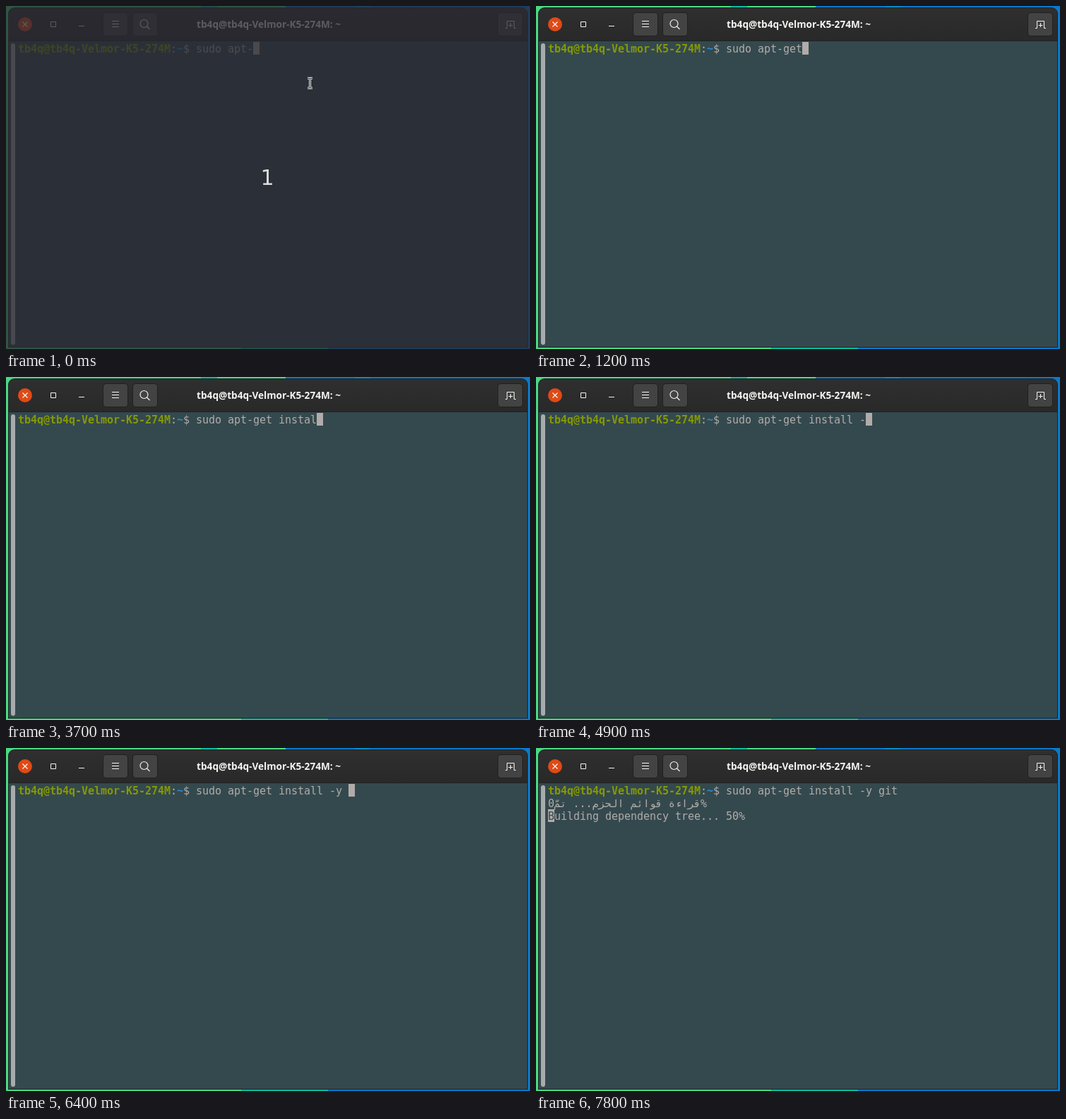
Write an HTML page with a canvas that moves like this. It is 742 px wide and 487 px high and loops after 8 s.

```html
<!DOCTYPE html>
<html lang="en">
<head>
<meta charset="utf-8">
<title>Terminal</title>
<style>
html, body { margin: 0; width: 100%; height: 100%; overflow: hidden; background: #34494e; }
canvas { display: block; }
</style>
</head>
<body>
<canvas id="stage" width="742" height="487"></canvas>
<script>
const g = document.getElementById('stage').getContext('2d');
const LOOP = 8000, CELL = 9, LINE = 18, LEFT = 17, TOP = 51;
const BG = '#34494e', FG = '#b1aca9', WHITE = '#f4f4f2';
const MONO = '15px "DejaVu Sans Mono", monospace';
const USER = 'tb4q@tb4q-Velmor-K5-274M';
const COMMAND = 'sudo apt-get install -y git';
const START = USER.length + 4;

// [time, typed characters, cursor hidden]
const KEYS = [
  [0, 9], [700, 11], [1200, 12], [1800, 12, 1], [2100, 12], [2400, 14],
  [2600, 15], [2800, 16], [3100, 17], [3500, 18], [3700, 19], [4500, 20],
  [4600, 20, 1], [4900, 22], [5300, 23], [5700, 22], [6100, 23], [6400, 24],
  [6900, 25], [7200, 26], [7400, 27], [7700, 27, 1]
];

function rect(x, y, w, h, color) {
  g.fillStyle = color;
  g.fillRect(x, y, w, h);
}

function round(x, y, w, h, r, color) {
  g.fillStyle = color;
  g.beginPath();
  g.roundRect(x, y, w, h, r);
  g.fill();
}

function stroke(path, color = WHITE, width = 1) {
  g.strokeStyle = color;
  g.lineWidth = width;
  g.stroke(new Path2D(path));
}

function cells(text, col, row, color, bold) {
  g.font = (bold ? 'bold ' : '') + MONO;
  g.fillStyle = color;
  [...text].forEach((ch, i) =>
    g.fillText(ch, LEFT + (col + i) * CELL, TOP + row * LINE + 15));
}

function cursor(col, row) {
  rect(LEFT + col * CELL, TOP + row * LINE, CELL, LINE, FG);
}

function button(x) {
  round(x, 9, 36, 34, 5, '#202020');
  round(x + 1, 10, 34, 32, 4, '#434343');
}

function drawDesktop() {
  const green = '#4bd983', teal = '#08bd9d', blue = '#0b79c9';
  rect(0, 0, 742, 487, green);
  rect(396, 0, 346, 487, blue);
  rect(276, 0, 23, 3, teal);
  rect(494, 0, 22, 3, '#078bc4');
  rect(333, 484, 123, 3, teal);
}

function drawWindow() {
  round(3, 2, 736, 483, [9, 9, 0, 0], '#1d2224');
  const bar = g.createLinearGradient(0, 3, 0, 49);
  bar.addColorStop(0, '#2f2f2f');
  bar.addColorStop(1, '#292929');
  round(4, 3, 734, 46, [8, 8, 0, 0], bar);
  rect(4, 50, 734, 434, BG);
  round(7, 53, 6, 428, 3, '#a8abac');

  round(17, 16, 20, 20, 10, '#df4a16');
  stroke('M23.5 22.5l7 7m0-7l-7 7', WHITE, 1.3);
  stroke('M63.5 22.5h7v7h-7z');
  stroke('M103 28.5h8');
  button(137);
  stroke('M150 21.5h10M150 25.5h10M150 29.5h10');
  button(179);
  stroke('M201 25a5.5 5.5 0 1 1-11 0a5.5 5.5 0 1 1 11 0M199.5 29l4 4', WHITE, 1.2);
  button(696);
  stroke('M707 31.5h2.5v-10h10v10h2.5M714.5 24v6M711.5 27.5h6');

  g.font = 'bold 13.6px "Open Sans", sans-serif';
  g.fillStyle = WHITE;
  g.textAlign = 'center';
  g.fillText(USER + ': ~', 372, 31);
  g.textAlign = 'left';
}

function drawOutput() {
  cells('0', 0, 1, FG);
  cells('%', 24, 1, FG);
  g.direction = 'rtl';
  g.textAlign = 'right';
  g.fillText('قراءة قوائم الحزم... تمّ', LEFT + 24 * CELL, TOP + LINE + 15);
  g.direction = 'ltr';
  g.textAlign = 'left';
  cursor(0, 2);
  cells('B', 0, 2, BG);
  cells('uilding dependency tree... 50%', 1, 2, FG);
}

function drawCountdown() {
  rect(0, 0, 742, 487, 'rgba(40, 41, 48, 0.75)');
  g.font = '30px "DejaVu Sans", sans-serif';
  g.fillStyle = '#dcdddd';
  g.textAlign = 'center';
  g.fillText('1', 370, 254);
  g.textAlign = 'left';
  const beam = 'M427 102.5h3l.5.5l.5-.5h3M430.5 103v13M427 116.5h3l.5-.5l.5.5h3';
  stroke(beam, '#f5f5f5', 3);
  stroke(beam, '#15181b', 1);
}

function draw(t) {
  const [, typed, hidden] = KEYS.findLast(k => k[0] <= t);
  drawDesktop();
  drawWindow();
  cells(USER, 0, 0, '#859900', true);
  cells(':', START - 4, 0, FG);
  cells('~', START - 3, 0, '#268bd2', true);
  cells('$', START - 2, 0, FG);
  cells(COMMAND.slice(0, typed), START, 0, FG);
  if (!hidden) cursor(START + typed, 0);
  if (t >= 7800) drawOutput();
  else if (t >= 7700) cursor(0, 1);
  if (t < 400) drawCountdown();
}

const begin = performance.now();
function tick() {
  draw((performance.now() - begin) % LOOP);
  requestAnimationFrame(tick);
}
tick();
</script>
</body>
</html>
```
